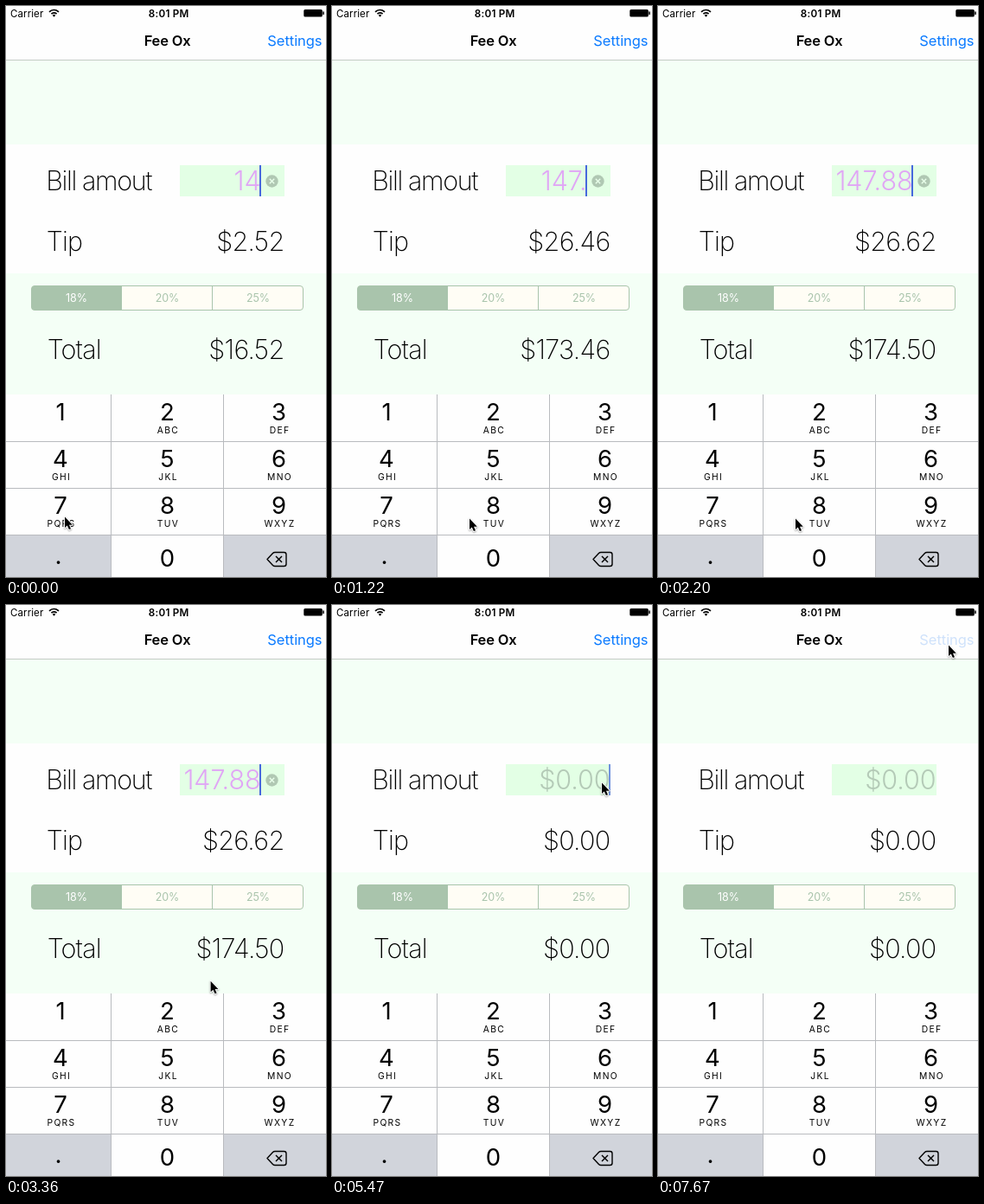
Animation, 370 px wide and 660 px high, one loop 8 s. Source, as an HTML page with a canvas:

```html
<!DOCTYPE html>
<html lang="en">
<head>
<meta charset="utf-8">
<title>Tip calculator</title>
<style>
  html, body { margin: 0; width: 100%; height: 100%; overflow: hidden; background: #fff; }
  canvas { display: block; width: 370px; height: 660px; }
</style>
</head>
<body>
<canvas id="stage"></canvas>
<script>
const W = 370, H = 660, LOOP = 8000;
const stage = document.getElementById('stage');
const dpr = window.devicePixelRatio || 1;
stage.width = W * dpr;
stage.height = H * dpr;
const c = stage.getContext('2d');

const FONT = 'Inter, Roboto, sans-serif';
const SAGE = '#a9c4ac', MINT = '#f4fff6', KEY_GREY = '#d1d4db';

// Pointer stops: time, x, y
const path = [
  [0, 67, 588], [270, 67, 588], [620, 66, 637], [950, 66, 637],
  [1220, 158, 590], [3180, 158, 590], [3540, 312, 277], [3700, 312, 277],
  [4060, 311, 203], [6250, 311, 203], [6260, 311, 200], [6430, 311, 200],
  [6970, 331, 93], [7140, 331, 93], [7410, 335, 44], [8000, 335, 44]
];
// Amounts: time, bill, tip, total
const amounts = [
  [0, '14', '$2.52', '$16.52'],
  [180, '147', '$26.46', '$173.46'],
  [880, '147.', '$26.46', '$173.46'],
  [1570, '147.8', '$26.60', '$174.40'],
  [2200, '147.88', '$26.62', '$174.50'],
  [4750, '', '$0.00', '$0.00']
];
// Key presses: key, start, end
const presses = [['7', 90, 260], ['.', 790, 960], ['8', 1400, 1570], ['8', 2020, 2200]];
// Caret fades: start, target opacity
const fades = [[2700, 0], [3150, 1], [3680, 0], [4120, 1], [5420, 0], [5870, 1],
  [6400, 0], [6850, 1], [7320, 0]];

const keys = ['1', '2ABC', '3DEF', '4GHI', '5JKL', '6MNO', '7PQRS', '8TUV', '9WXYZ', '.', '0', '<'];
const colX = [0, 122, 252, 370], rowY = [449, 504, 558, 612, 660];
const keyMid = [63, 186.5, 315.5];

const clamp = v => Math.max(0, Math.min(1, v));

function rect(x, y, w, h, color) {
  c.fillStyle = color;
  c.fillRect(x, y, w, h);
}

function text(str, x, y, size, weight, color, align = 'left', track = 0) {
  c.font = `${weight} ${size}px ${FONT}`;
  c.letterSpacing = track + 'px';
  c.textAlign = align;
  c.fillStyle = color;
  c.fillText(str, x, y);
}

const label = (str, x, y, track) => text(str, x, y, 30.5, 150, '#000', 'left', track);
const amount = (str, y) => text(str, 321.5, y, 30.5, 150, '#000', 'right', -0.7);

function line(points, width, color) {
  c.beginPath();
  points.forEach(([x, y]) => c.lineTo(x, y));
  c.lineWidth = width;
  c.strokeStyle = color;
  c.stroke();
}

function pointerAt(t) {
  const i = path.findIndex(p => p[0] > t);
  const [t0, x0, y0] = path[i - 1], [t1, x1, y1] = path[i];
  const k = (t - t0) / (t1 - t0), e = k * k * (3 - 2 * k);
  return [x0 + (x1 - x0) * e, y0 + (y1 - y0) * e];
}

function caretAlpha(t) {
  let a = 1;
  for (const [start, to] of fades) if (t >= start) a += (to - a) * clamp((t - start) / 180);
  return a;
}

function drawBars(t) {
  rect(0, 62, W, 1, '#c4cbc5');
  text('Carrier', 5, 12.5, 11.5, 400, '#000', 'left', 0.1);
  text('8:01 PM', 188.2, 12.5, 11.7, 600, '#000', 'center', 0.25);
  c.strokeStyle = c.fillStyle = '#000';
  c.lineWidth = 1.7;
  for (const r of [4.2, 7.5]) {
    c.beginPath();
    c.arc(55.5, 12, r, -Math.PI * 0.76, -Math.PI * 0.24);
    c.stroke();
  }
  c.beginPath();
  c.moveTo(55.5, 12.8);
  c.arc(55.5, 12.4, 2.4, -Math.PI * 0.76, -Math.PI * 0.24);
  c.fill();
  c.beginPath();
  c.roundRect(344.3, 4, 21.5, 8.5, 1.5);
  c.roundRect(366.3, 6.3, 1.5, 4, 0.7);
  c.fill();
  text('Fee Ox', 186.5, 46, 16.5, 600, '#000', 'center', -0.2);
  text('Settings', 365.5, 46, 16.5, 400, t >= 7670 ? '#cfe2fb' : '#0a7aff', 'right', -0.05);
}

function drawField(t, bill) {
  rect(201, 184, 121, 36, '#e3ffe5');
  if (bill) {
    text(bill, 294.5, 213, 30.5, 300, '#e0a6f5', 'right', -0.1);
    c.beginPath();
    c.arc(307.5, 202.5, 7.2, 0, 7);
    c.fillStyle = t >= 4670 ? '#8fa392' : '#b0c8b3';
    c.fill();
    line([[304.8, 199.8], [310.2, 205.2]], 1.3, '#e9ffeb');
    line([[310.2, 199.8], [304.8, 205.2]], 1.3, '#e9ffeb');
  } else {
    text('$0.00', 321.5, 213, 30.5, 300, '#b4cab7', 'right', -0.1);
  }
  c.globalAlpha = caretAlpha(t);
  rect(bill ? 293 : 320, 184, 2, 36, '#4668dd');
  c.globalAlpha = 1;
}

function drawSegments() {
  const labels = ['18%', '20%', '25%'];
  c.beginPath();
  c.roundRect(29.5, 323.5, 314, 28, 3.5);
  c.fillStyle = '#fffdf5';
  c.fill();
  c.save();
  c.clip();
  rect(29, 323, 105, 29, SAGE);
  rect(238, 323, 1, 29, SAGE);
  c.restore();
  c.lineWidth = 1;
  c.strokeStyle = SAGE;
  c.stroke();
  labels.forEach((s, i) => text(s, 81.5 + i * 105, 342, 12.5, 400, i ? SAGE : '#fff', 'center', -0.1));
}

function drawDelete(x, y) {
  c.beginPath();
  c.moveTo(x - 11, y);
  c.lineTo(x - 4.5, y - 7);
  c.quadraticCurveTo(x - 3.5, y - 8, x - 2, y - 8);
  c.arcTo(x + 11, y - 8, x + 11, y, 2.5);
  c.arcTo(x + 11, y + 8, x, y + 8, 2.5);
  c.lineTo(x - 2, y + 8);
  c.quadraticCurveTo(x - 3.5, y + 8, x - 4.5, y + 7);
  c.closePath();
  c.lineWidth = 1.4;
  c.lineJoin = 'round';
  c.strokeStyle = '#000';
  c.stroke();
  line([[x - 1, y - 3.5], [x + 6, y + 3.5]], 1.4, '#000');
  line([[x + 6, y - 3.5], [x - 1, y + 3.5]], 1.4, '#000');
}

function drawKeys(t) {
  keys.forEach((key, i) => {
    const col = i % 3, row = Math.floor(i / 3), x = colX[col], y = rowY[row];
    const main = key[0], sub = key.slice(1), mid = keyMid[col];
    const down = presses.some(([k, a, b]) => k === main && t >= a && t < b);
    const dark = (main === '.' || main === '<') !== down;
    rect(x, y, colX[col + 1] - x, rowY[row + 1] - y, dark ? KEY_GREY : '#fefefe');
    if (main === '<') drawDelete(313, 639.5);
    else if (main === '.') text('.', 60.5, 645, 28, 400, '#000', 'center');
    else text(main, mid, row === 3 ? 648 : 479 + row * 54, 27.5, 400, '#000', 'center');
    if (sub) text(sub, mid + 1, 494 + row * 54, 10.3, 400, '#000', 'center', 1.3);
  });
  for (const y of [503, 557, 611]) rect(0, y, W, 1, '#b9bbbf');
  for (const x of [121, 251]) rect(x, 449, 1, 211, '#b9bbbf');
}

function drawPointer(x, y) {
  const shape = [[0, 0], [0, 12.6], [2.8, 10], [4.9, 14.6], [7, 13.7], [5, 9.2], [8.8, 9.2]];
  c.save();
  c.translate(x + 1, y + 2.5);
  c.beginPath();
  shape.forEach(([px, py]) => c.lineTo(px, py));
  c.closePath();
  c.shadowColor = 'rgba(0,0,0,.35)';
  c.shadowBlur = 2;
  c.shadowOffsetY = 1;
  c.lineWidth = 1.8;
  c.lineJoin = 'round';
  c.strokeStyle = '#fff';
  c.stroke();
  c.shadowColor = 'transparent';
  c.fillStyle = '#000';
  c.fill();
  c.restore();
}

function draw(t) {
  const [, bill, tip, total] = amounts.filter(a => t >= a[0]).pop();
  c.setTransform(dpr, 0, 0, dpr, 0, 0);
  rect(0, 0, W, H, '#fefefe');
  rect(0, 63, W, 97, MINT);
  rect(0, 309, W, 140, MINT);
  drawBars(t);
  label('Bill amout', 46.3, 213, -1.4);
  drawField(t, bill);
  label('Tip', 46.8, 283, -0.9);
  amount(tip, 283);
  drawSegments();
  label('Total', 47.8, 408, -0.9);
  amount(total, 408);
  drawKeys(t);
  drawPointer(...pointerAt(t));
}

function frame(now) {
  draw(now % LOOP);
  requestAnimationFrame(frame);
}
requestAnimationFrame(frame);
</script>
</body>
</html>
```
